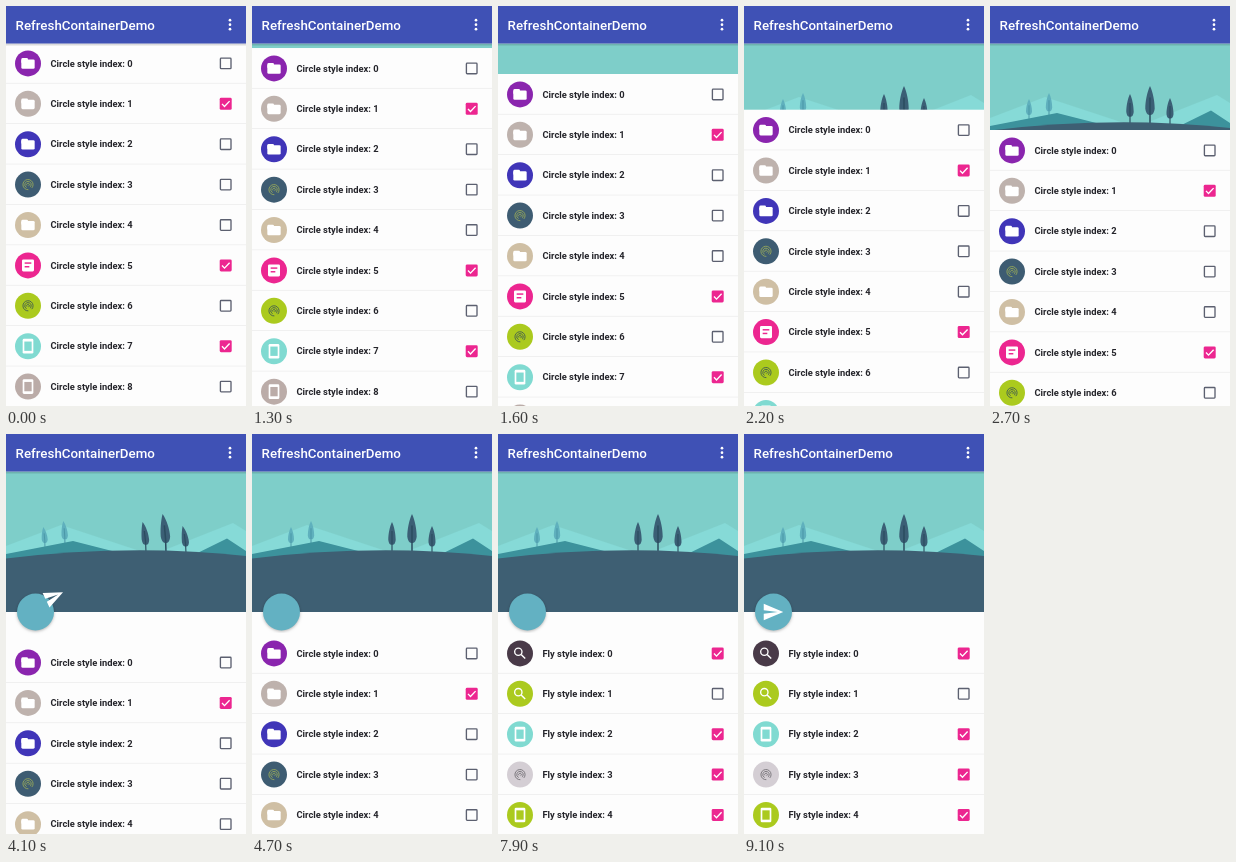
An HTML page with a canvas that plays this animation: 240x400 px, repeating every 9600 ms.

```html
<!DOCTYPE html>
<html lang="en">
<head>
<meta charset="utf-8">
<title>Pull to refresh</title>
<style>
  html, body { margin: 0; width: 100%; height: 100%; overflow: hidden; background: #fdfdfd; }
  canvas { display: block; width: 240px; height: 400px; }
</style>
</head>
<body>
<canvas id="stage"></canvas>
<script>
const W = 240, H = 400, LOOP = 9600, STEP = 100;
const BAR = 37.5, HEADER_END = 178, OPEN = 199, ROW = 40.4;
const BUTTON = { x: 29.5, y: 178, r: 18.5 };
const PAPER = '#fdfdfd', PINK = '#ec2690', LIME = '#abca1e', AQUA = '#80dad1';

const canvas = document.getElementById('stage');
const ctx = canvas.getContext('2d');
const dpr = window.devicePixelRatio || 1;
canvas.width = W * dpr;
canvas.height = H * dpr;

// Each item: icon, disc colour, checked, icon colour
const circleItems = [
  ['folder', '#8a25ae', 0],
  ['folder', '#beb2ad', 1],
  ['folder', '#4035b8', 0],
  ['print', '#3e5c72', 0, '#93a55c'],
  ['folder', '#cfbfa4', 0],
  ['note', PINK, 1],
  ['print', LIME, 0, '#46604f'],
  ['phone', AQUA, 1],
  ['phone', '#bbaca8', 0],
  ['folder', '#4035b8', 0]
];
const flyItems = [
  ['search', '#493a48', 1],
  ['search', LIME, 0],
  ['phone', AQUA, 1],
  ['print', '#d4ced4', 1, '#77747a'],
  ['phone', LIME, 1],
  ['folder', '#cfbfa4', 0]
];

// Panel top while dragging: time, position, speed
const drag = [
  [1200, 37, 0.03], [1600, 68, 0.08], [2100, 100, 0.04], [2700, 124, 0.06],
  [3200, 182, 0.13], [3400, 201.5, 0.06], [3700, 212, 0]
];

const clamp = v => Math.max(0, Math.min(1, v));
const mix = (a, b, k) => a + (b - a) * k;
const span = (t, from, to) => clamp((t - from) / (to - from));

function hermite(keys, t) {
  if (t <= keys[0][0]) return keys[0][1];
  for (let i = 1; i < keys.length; i++) {
    const [t0, p0, v0] = keys[i - 1], [t1, p1, v1] = keys[i];
    if (t > t1) continue;
    const d = t1 - t0, u = (t - t0) / d, u2 = u * u, u3 = u2 * u;
    return (2 * u3 - 3 * u2 + 1) * p0 + (u3 - 2 * u2 + u) * d * v0 +
      (3 * u2 - 2 * u3) * p1 + (u3 - u2) * d * v1;
  }
  return keys[keys.length - 1][1];
}

// Quadratic path easing with control point (cx, 1)
function pathEase(cx, x) {
  const a = 1 - 2 * cx;
  const s = Math.abs(a) < 1e-6 ? x : (-cx + Math.sqrt(cx * cx + a * x)) / a;
  return 2 * s - s * s;
}

function panelTop(t) {
  if (t < 4050) return hermite(drag, t);
  return OPEN + 13 * Math.pow(1 - span(t, 4050, 4500), 3);
}

function treeBend(t) {
  if (t < 4050) return Math.max(0, panelTop(t) - OPEN) * 0.4;
  const u = span(t, 4050, 4700);
  return 5.2 * Math.cos(u * 9) * (1 - u) * (1 - u);
}

function polygon(points, color) {
  ctx.fillStyle = color;
  ctx.beginPath();
  points.forEach(([x, y]) => ctx.lineTo(x, y));
  ctx.fill();
}

function disc(x, y, r, color) {
  ctx.fillStyle = color;
  ctx.beginPath();
  ctx.arc(x, y, r, 0, Math.PI * 2);
  ctx.fill();
}

function box(x, y, w, h, r, color) {
  ctx.fillStyle = color;
  ctx.beginPath();
  ctx.roundRect(x, y, w, h, r);
  ctx.fill();
}

function line(points, color, width) {
  ctx.strokeStyle = color;
  ctx.lineWidth = width;
  ctx.beginPath();
  points.forEach(([x, y]) => ctx.lineTo(x, y));
  ctx.stroke();
}

function tree(x, top, base, w, crown, trunk, bend) {
  const h = base - top;
  const px = k => x - bend * k * k;
  const py = k => base - h * k;
  ctx.fillStyle = crown;
  ctx.beginPath();
  ctx.moveTo(px(1), top);
  ctx.bezierCurveTo(px(0.8) + w * 0.3, py(0.85), px(0.55) + w * 0.5, py(0.6), px(0.4) + w * 0.5, py(0.4));
  ctx.quadraticCurveTo(px(0.25) + w * 0.4, py(0.22), px(0.24), py(0.24));
  ctx.quadraticCurveTo(px(0.25) - w * 0.4, py(0.22), px(0.4) - w * 0.5, py(0.4));
  ctx.bezierCurveTo(px(0.55) - w * 0.5, py(0.6), px(0.8) - w * 0.3, py(0.85), px(1), top);
  ctx.fill();
  ctx.strokeStyle = trunk;
  ctx.lineWidth = w * 0.16;
  ctx.beginPath();
  ctx.moveTo(x, base + 1);
  ctx.quadraticCurveTo(x, py(0.35), px(0.7), py(0.7));
  ctx.stroke();
}

function drawScene(t) {
  const bend = treeBend(t);
  ctx.fillStyle = '#7ecec9';
  ctx.fillRect(0, BAR, W, HEADER_END - BAR);
  polygon([[0, 112], [55, 91], [146, 121], [227, 89], [240, 97], [240, 178], [0, 178]], '#86dad7');
  const far = ['#5fb0bd', '#4b97a8'];
  tree(39, 93, 114, 6, ...far, bend * 0.5);
  tree(59, 87, 111, 6.4, ...far, bend * 0.5);
  polygon([[0, 120], [67, 107], [165, 132], [221, 104.5], [240, 117], [240, 178], [0, 178]], '#3c929c');
  const near = ['#3b5f75', '#2b4c5f'];
  tree(140, 88, 118, 7.4, ...near, bend);
  tree(160, 80, 118, 9.4, ...near, bend);
  tree(180, 92, 119, 7, ...near, bend);
  ctx.fillStyle = '#3e5f73';
  ctx.beginPath();
  ctx.moveTo(0, 124.5);
  ctx.quadraticCurveTo(125, 109.5, W, 122);
  ctx.lineTo(W, HEADER_END);
  ctx.lineTo(0, HEADER_END);
  ctx.fill();
}

function drawButton() {
  ctx.save();
  ctx.shadowColor = 'rgba(0,0,0,0.28)';
  ctx.shadowBlur = 3 * dpr;
  ctx.shadowOffsetY = dpr;
  disc(BUTTON.x, BUTTON.y, BUTTON.r, '#63b1c2');
  ctx.restore();
}

function planePose(t) {
  const pose = { x: 0, y: 0, sx: 1, sy: 1, turn: 0 };
  if (t < 4050) {
    pose.turn = -Math.max(0, panelTop(t) - OPEN) * 1.3;
  } else if (t < 4700) {
    const u = span(t, 4050, 4680), k = pathEase(0.7, u);
    const scale = mix(1, 0.5, u);
    pose.x = W * u;
    pose.y = -141 * k;
    pose.sx = scale;
    pose.sy = scale * Math.cos(k * Math.PI / 3);
    pose.turn = -30 * (1 - u) * (1 - u);
  } else if (t < 7900) {
    return null;
  } else if (t < 8600) {
    const u = span(t, 7900, 8500), scale = mix(0.5, 0.9, u);
    pose.x = mix(W, -52, u);
    pose.y = mix(-141, 10, pathEase(0.1, u));
    pose.sx = -scale;
    pose.sy = scale * 0.7;
  } else {
    const u = span(t, 8600, 9100), scale = mix(0.9, 1, u);
    pose.x = mix(-50, 0, u);
    pose.y = 10 * (1 - u);
    pose.sx = scale;
    pose.sy = scale * Math.cos((1 - u) * Math.PI / 6);
  }
  return pose;
}

function drawPlane(t) {
  const pose = planePose(t);
  if (!pose) return;
  ctx.save();
  ctx.translate(BUTTON.x + pose.x, BUTTON.y + pose.y);
  ctx.rotate(pose.turn * Math.PI / 180);
  ctx.scale(pose.sx * 0.93, pose.sy * 0.93);
  polygon([[-10.5, 9], [10.5, 0], [-10.5, -9], [-10.5, -2], [4.5, 0], [-10.5, 2]], '#fff');
  ctx.restore();
}

// Icons live on a 24-unit grid centred on the origin
const icons = {
  folder() {
    box(-10, -8, 10, 8, 2, '#fff');
    box(-10, -6, 20, 14, 2, '#fff');
  },
  note(color) {
    box(-9, -9, 18, 18, 2, '#fff');
    line([[-5, -3.5], [5, -3.5]], color, 2.2);
    line([[-5, 2], [2, 2]], color, 2.2);
  },
  phone(color) {
    box(-8, -11, 16, 22, 2, '#fff');
    box(-5.5, -7, 11, 14, 0, color);
  },
  search() {
    ctx.strokeStyle = '#fff';
    ctx.lineWidth = 2;
    ctx.beginPath();
    ctx.arc(-2.5, -2.5, 5.5, 0, Math.PI * 2);
    ctx.stroke();
    line([[1.7, 1.7], [7.8, 7.8]], '#fff', 2.2);
  },
  print(color, ink) {
    ctx.strokeStyle = ink;
    ctx.lineWidth = 1.4;
    [2, 4.8, 7.6].forEach((r, i) => {
      ctx.beginPath();
      ctx.arc(0, 0, r, 2.5 - i * 0.5, 7.4 - i * 0.2);
      ctx.stroke();
    });
  }
};

function drawCheckbox(y, checked) {
  if (checked) {
    box(213.7, y - 6, 12, 12, 1.4, PINK);
    line([[216, y + 0.1], [218.5, y + 2.7], [223.6, y - 2.7]], '#fff', 1.35);
    return;
  }
  ctx.strokeStyle = '#5c6070';
  ctx.lineWidth = 1.35;
  ctx.beginPath();
  ctx.roundRect(214.4, y - 5.3, 10.6, 10.6, 0.8);
  ctx.stroke();
}

function drawList(t) {
  const top = panelTop(t), fresh = t >= 7900;
  const items = fresh ? flyItems : circleItems;
  ctx.fillStyle = PAPER;
  ctx.fillRect(0, top, W, H - top);
  ctx.font = 'bold 9.33px Roboto, sans-serif';
  items.forEach(([icon, color, checked, ink], i) => {
    const y = top + ROW * (i + 0.5) + 0.2;
    disc(22, y, 13, color);
    ctx.save();
    ctx.translate(22, y);
    ctx.scale(0.667, 0.667);
    icons[icon](color, ink);
    ctx.restore();
    ctx.fillStyle = '#24242a';
    ctx.fillText((fresh ? 'Fly' : 'Circle') + ' style index: ' + i, 44.5, y + 3.2);
    drawCheckbox(y, checked);
    ctx.fillStyle = '#ebebeb';
    ctx.fillRect(0, top + ROW * (i + 1) - 0.5, W, 0.7);
  });
}

function drawBar() {
  const shade = ctx.createLinearGradient(0, BAR, 0, BAR + 3);
  shade.addColorStop(0, 'rgba(0,0,0,0.2)');
  shade.addColorStop(1, 'rgba(0,0,0,0)');
  ctx.fillStyle = shade;
  ctx.fillRect(0, BAR, W, 3);
  ctx.fillStyle = '#3f51b5';
  ctx.fillRect(0, 0, W, BAR);
  ctx.fillStyle = '#fff';
  ctx.font = '500 13.33px Roboto, sans-serif';
  ctx.fillText('RefreshContainerDemo', 9.6, 23.6);
  [14.2, 18.7, 23.2].forEach(y => disc(224, y, 1.35, '#fff'));
}

function draw(t) {
  ctx.setTransform(dpr, 0, 0, dpr, 0, 0);
  ctx.fillStyle = PAPER;
  ctx.fillRect(0, 0, W, H);
  drawScene(t);
  drawButton();
  drawPlane(t);
  drawList(t);
  drawBar();
}

function tick() {
  const t = performance.now() % LOOP;
  draw(Math.floor(t / STEP) * STEP);
  requestAnimationFrame(tick);
}
tick();
</script>
</body>
</html>
```
